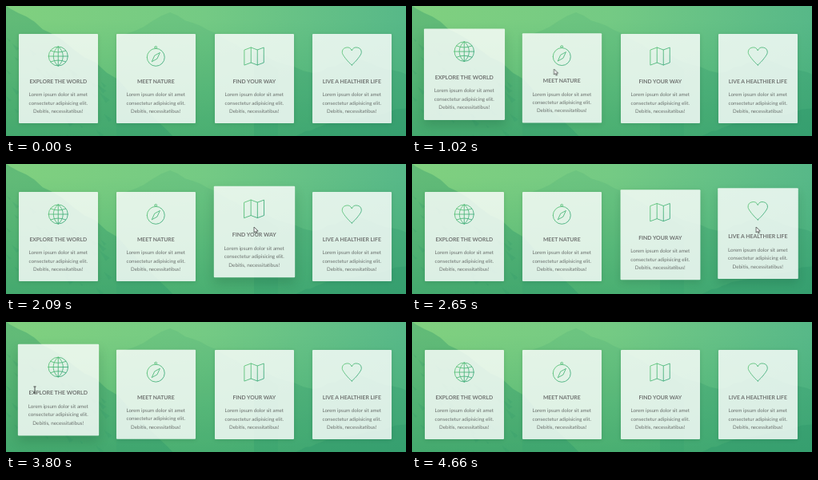
Recreate the animation shown at these times as an HTML page. Size 500 by 163 pixels, loop 4.89 s.

```html
<!DOCTYPE html>
<html lang="en">
<head>
<meta charset="utf-8">
<title>Hover cards</title>
<style>
  html, body { margin: 0; width: 100%; height: 100%; overflow: hidden; background: #5dba78; }
  #stage { position: relative; width: 500px; height: 163px; overflow: hidden; }
  #stage > svg { position: absolute; left: 0; top: 0; }
  .card { position: absolute; top: 35px; width: 98.5px; height: 112px; border-radius: 1px;
          background: rgba(255,255,255,.81); }
  .card svg { display: block; overflow: visible; }
  .card text { font: 6.2px Lato, sans-serif; fill: #6b706d; text-anchor: middle; text-rendering: geometricPrecision; }
  .card .title { font-weight: 700; font-size: 6.8px; fill: #707371; }
  .icon { fill: none; stroke: url(#ink); stroke-width: .85; stroke-linejoin: round; stroke-linecap: round; }
</style>
</head>
<body>
<div id="stage">
  <svg width="500" height="163" viewBox="0 0 500 163">
    <defs>
      <linearGradient id="sky">
        <stop offset="0" stop-color="#80d07f"/>
        <stop offset=".5" stop-color="#74ca84"/>
        <stop offset="1" stop-color="#57b888"/>
      </linearGradient>
      <linearGradient id="depth" x1="0" y1="0" x2="0" y2="1">
        <stop offset=".1" stop-color="#2f9f66" stop-opacity="0"/>
        <stop offset="1" stop-color="#2f9f66" stop-opacity=".55"/>
      </linearGradient>
      <linearGradient id="ink" gradientUnits="userSpaceOnUse" x1="-12" y1="-8" x2="12" y2="8">
        <stop offset="0" stop-color="#5cc474"/>
        <stop offset="1" stop-color="#35a479"/>
      </linearGradient>
      <filter id="soft"><feGaussianBlur stdDeviation=".6"/></filter>
    </defs>
    <rect width="500" height="163" fill="url(#sky)"/>
    <rect width="500" height="163" fill="url(#depth)"/>
    <g id="land" fill="#2b946a" filter="url(#soft)"></g>
  </svg>
  <svg id="cursor" width="1" height="1" overflow="visible" style="z-index:2">
    <path id="arrow" d="M0 0V7L1.7 5.5 2.8 8 4 7.5 3 5H5.2Z" fill="#f6f6f6" stroke="#303432" stroke-width=".7"/>
    <path id="beam" d="M-1.6-4H1.6M0-4V4M-1.6 4H1.6" fill="none" stroke="#3a3e3c" stroke-width=".9"/>
  </svg>
</div>
<script>
const LOOP = 4890, FADE = 320;
const stage = document.getElementById('stage');

let seed = 7;
const random = () => (seed = seed * 16807 % 2147483647) / 2147483647;

// Rough mountain silhouette through a few corners, closed along the bottom edge.
function ridge(corners, opacity) {
  const [first, ...rest] = corners;
  let [x, y] = first, d = `M${x} 170L${x} ${y}`;
  for (const [nx, ny] of rest) {
    for (let k = 1; k <= 6; k++) {
      const jag = k < 6 ? (random() - .5) * 4 : 0;
      d += `L${x + (nx - x) * k / 6} ${y + (ny - y) * k / 6 + jag}`;
    }
    [x, y] = [nx, ny];
  }
  return `<path opacity="${opacity}" d="${d}V170Z"/>`;
}

const streaks = Array.from({ length: 45 }, () => {
  const x = random() * 130, y = x * .65 + 12 + random() * 110, len = 4 + random() * 9;
  return `<path opacity=".16" d="M${x} ${y}l${len} ${len * .7}l${-len * .4} ${len * .3}Z"/>`;
}).join('');

document.getElementById('land').innerHTML =
  ridge([[-5, -4], [56, 34], [140, 92], [215, 170]], .34) + streaks +
  ridge([[138, 42], [205, 8], [262, 34], [340, 80]], .12) +
  ridge([[310, 58], [384, 84], [440, 66], [505, 88]], .22) +
  ridge([[362, 163], [400, 148], [505, 128]], .35);

const circle = (r, y = 0) => `M${-r} ${y}a${r} ${r} 0 1 1 ${2 * r} 0a${r} ${r} 0 1 1 ${-2 * r} 0`;
const cards = [
  { title: 'EXPLORE THE WORLD', drop: 28,
    icon: circle(12) + 'M0-12V12M-12 0H12M0-12C-8-6-8 6 0 12M0-12C8-6 8 6 0 12M-9.4-7Q0-3 9.4-7M-9.4 7Q0 3 9.4 7' },
  { title: 'MEET NATURE', drop: 29.3,
    icon: circle(11) + circle(1.4, -12.5) + 'M5-5.5 1.7 1.8-5 5.5-1.7-1.8Z' },
  { title: 'FIND YOUR WAY', drop: 28,
    icon: 'M-12-8-4-11 4-8 12-11V8L4 11-4 8-12 11ZM-4-11V8M4-8V11' },
  { title: 'LIVE A HEALTHIER LIFE', drop: 28,
    icon: 'M0 11C-5 7-12-2-12-4.5A6.2 6.2 0 0 1 0-7A6.2 6.2 0 0 1 12-4.5C12-2 5 7 0 11Z' }
];
const lines = ['Lorem ipsum dolor sit amet', 'consectetur adipisicing elit.', 'Debitis, necessitatibus!'];

// When the pointer reaches each card; -1 is outside.
const visits = [[555, 0], [985, 1], [1720, 2], [2533, 3], [3210, 2], [3335, 1], [3550, 0], [4340, -1]];

const pointer = [
  [0, -12, 130], [360, -12, 130], [850, 62, 80], [900, 62, 80],
  [1050, 187, 79], [1550, 187, 79], [1820, 310, 79], [2350, 310, 79],
  [2680, 432, 79], [3110, 432, 79], [3340, 205, 84], [3800, 36, 85],
  [4180, 36, 85], [4460, -12, 105], [LOOP, -12, 105]
];

function play(el, steps, easing) {
  const frames = steps.map(([ms, props]) => ({ offset: ms / LOOP, easing, ...props }));
  el.animate(frames, { duration: LOOP, iterations: Infinity });
}

const raised = v => ({
  transform: `translateY(${-6 * v}px) scale(${1 + .024 * v})`,
  boxShadow: `0 ${1 + 6 * v}px ${5 + 9 * v}px rgba(0,50,30,${.13 + .05 * v})`
});

// Each visit raises the card, as far as its length allows, then lowers it.
function liftSteps(index) {
  const steps = visits.flatMap(([enter, card], n) => {
    if (card !== index) return [];
    const leave = visits[n + 1][0];
    const part = Math.min(1, (leave - enter) / FADE);
    const top = 1 - (1 - part) ** 2.5;
    return [[enter, 0], [enter + part * FADE, top], [leave, top], [leave + FADE, 0]];
  });
  return [[0, 0], ...steps, [LOOP, 0]].map(([ms, v]) => [ms, raised(v)]);
}

cards.forEach(({ title, drop, icon }, i) => {
  const card = document.createElement('div');
  card.className = 'card';
  card.style.left = 15.75 + 122.5 * i + 'px';
  const body = lines.map((s, n) => `<text x="49.25" y="${78.2 + 10.3 * n}">${s}</text>`).join('');
  card.innerHTML = `<svg width="98" height="112">
    <path class="icon" transform="translate(49.25 ${drop})" d="${icon}"/>
    <text class="title" x="49.25" y="61.9">${title}</text>${body}</svg>`;
  stage.append(card);
  play(card, liftSteps(i), 'ease');
});

play(document.getElementById('cursor'),
  pointer.map(([ms, x, y]) => [ms, { transform: `translate(${x}px, ${y}px)` }]), 'ease-in-out');

// The pointer becomes a text beam while it is over a heading.
const visibility = over => [[0, 0], [3600, 1], [4215, 0], [LOOP, 0]]
  .map(([ms, beam]) => [ms, { opacity: beam === over ? 1 : 0 }]);
play(document.getElementById('arrow'), visibility(0), 'step-end');
play(document.getElementById('beam'), visibility(1), 'step-end');
</script>
</body>
</html>
```
